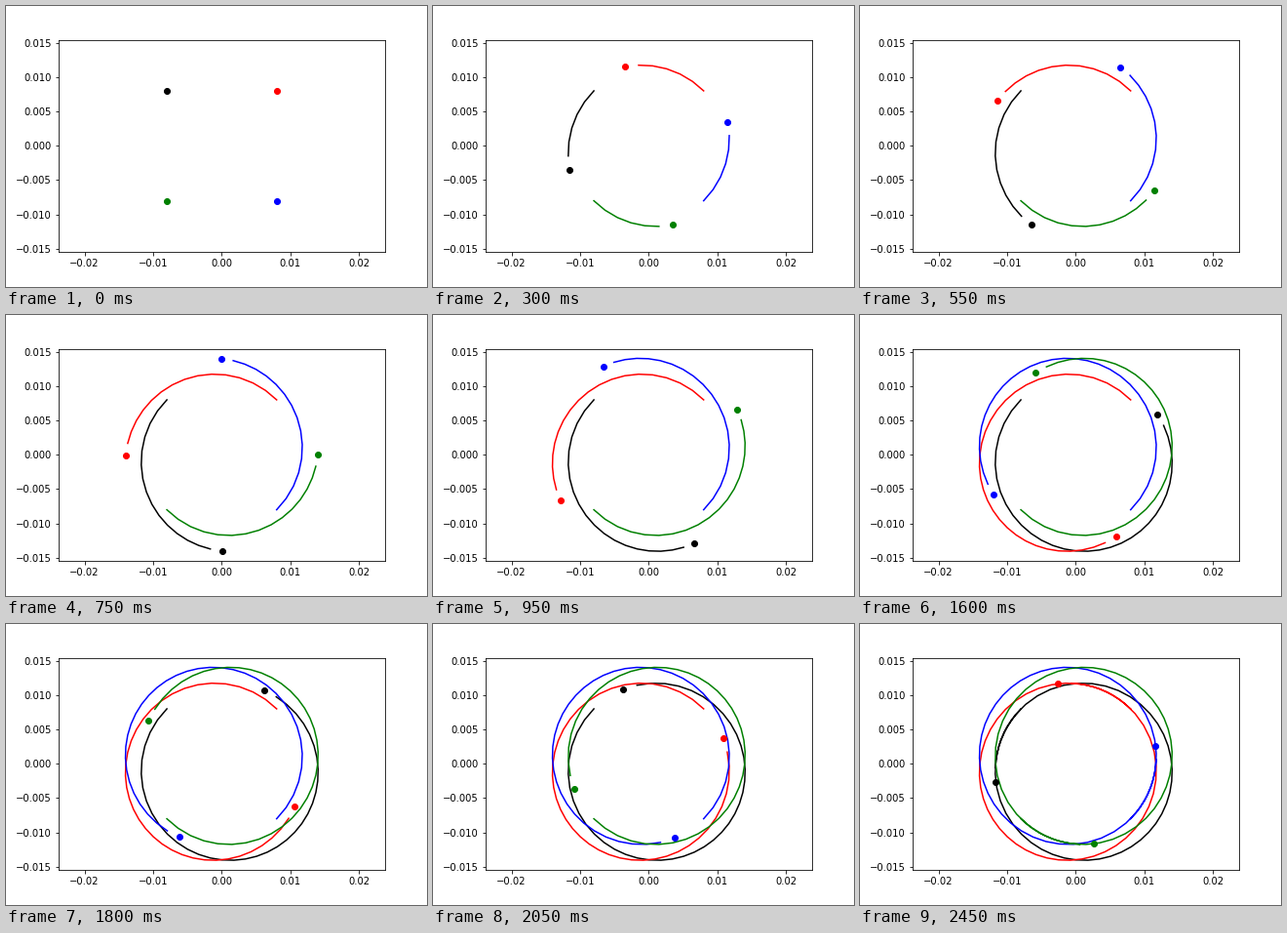
These frames come from a looping animation (432x288 px, 2.5 s). A matplotlib script:

```python
import numpy as np
import matplotlib.pyplot as plt
from matplotlib.animation import FuncAnimation

FRAMES = 50
STEP_MS = 50
START = 0.008                     # each body starts on a corner of a square
ECC = 0.126                       # orbit eccentricity
MEAN_MOTION = np.radians(8.287)   # mean anomaly gained per frame
BODIES = [("black", 1), ("red", 0), ("blue", 3), ("green", 2)]  # quarter turns


def kepler_orbit(mean):
    """Points of an ellipse around its focus, closest approach at 45 degrees."""
    axis = START * np.sqrt(2) / (1 - ECC)
    anomaly = mean.copy()
    for _ in range(30):
        anomaly = mean + ECC * np.sin(anomaly)
    x = axis * (np.cos(anomaly) - ECC)
    y = axis * np.sqrt(1 - ECC ** 2) * np.sin(anomaly)
    return (x + 1j * y) * np.exp(1j * np.pi / 4)


plt.rcParams.update({"font.family": "DejaVu Sans", "font.size": 10})
fig = plt.figure(figsize=(6, 4), dpi=72, facecolor="white")
fig.subplots_adjust(left=0.125, right=0.9, bottom=0.125, top=0.88)
ax = fig.add_subplot()

orbit = kepler_orbit(MEAN_MOTION * np.arange(FRAMES))
paths = [orbit * 1j ** turns for _, turns in BODIES]

box = ax.get_position()
half_height = 1.1 * max(path.imag.max() for path in paths)
half_width = half_height * (box.width * 6) / (box.height * 4)
ax.set_xlim(-half_width, half_width)
ax.set_ylim(-half_height, half_height)

trails = [ax.plot([], [], color=color, lw=1.5)[0] for color, _ in BODIES]
dots = [ax.plot([], [], "o", color=color, ms=6)[0] for color, _ in BODIES]


def update(i):
    for path, trail, dot in zip(paths, trails, dots):
        trail.set_data(path.real[:i], path.imag[:i])
        dot.set_data([path.real[i]], [path.imag[i]])
    return trails + dots


anim = FuncAnimation(fig, update, frames=FRAMES, interval=STEP_MS,
                     init_func=lambda: update(0), repeat=True, repeat_delay=0)
plt.show()
```
